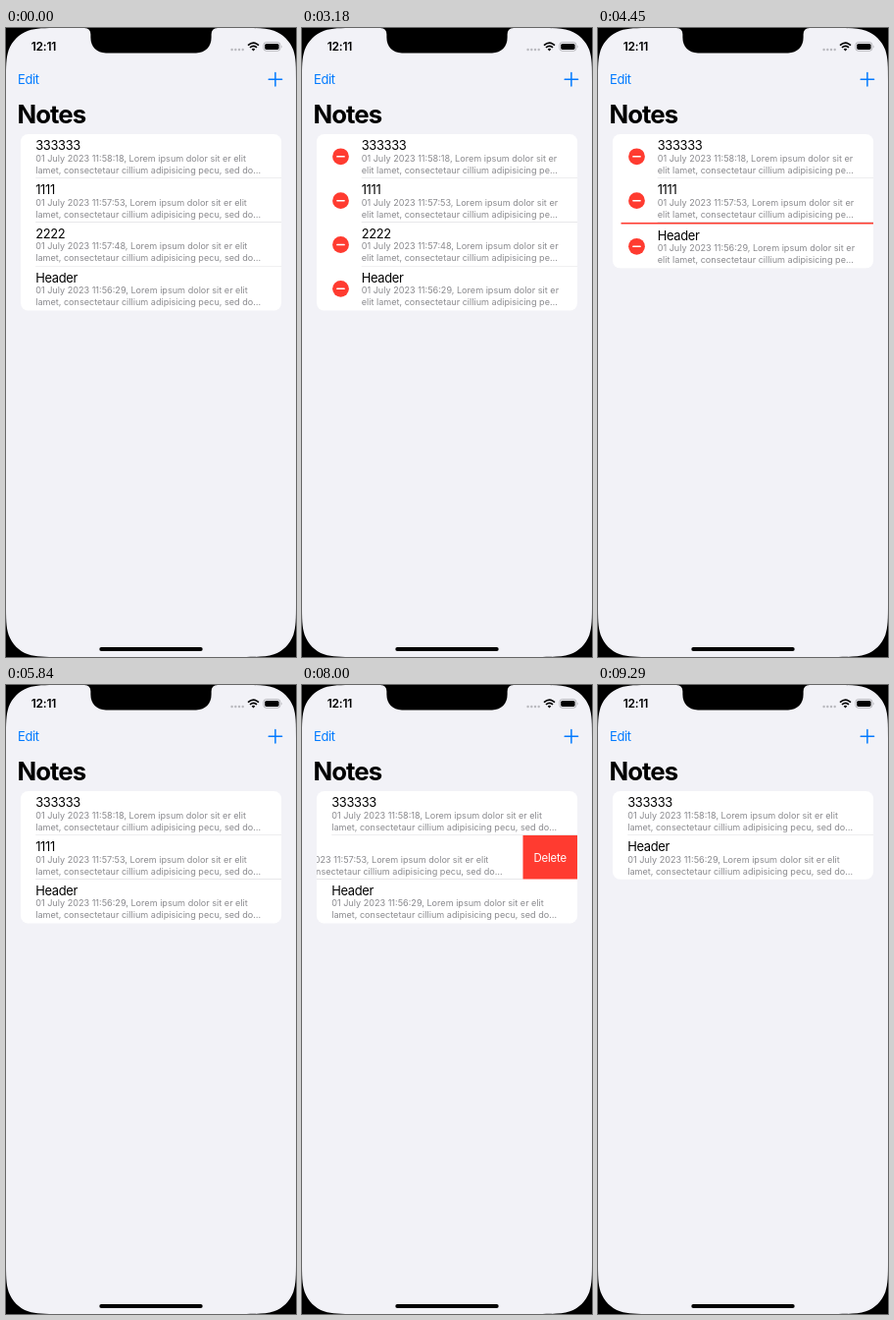
Write an HTML page that moves like this. It is 296 px wide and 640 px high and loops after 9580 ms.

```html
<!DOCTYPE html>
<html lang="en">
<head>
<meta charset="utf-8">
<title>Notes</title>
<style>
  html, body { margin: 0; width: 100%; height: 100%; overflow: hidden; background: #f2f2f7; }
  #stage { display: block; width: 296px; height: 640px; }
  text { font-family: Inter, "Liberation Sans", sans-serif; }
  .head { font-size: 12.9px; letter-spacing: -.33px; }
  .sub { font-size: 9.1px; fill: #8a8a8e; }
  .del { font-size: 11.4px; letter-spacing: -.2px; fill: #fff; text-anchor: middle; }
  .title { font-size: 25.8px; font-weight: 700; letter-spacing: -1px; }
  .time { font-size: 12px; font-weight: 600; letter-spacing: -.25px; }
</style>
</head>
<body>
<svg id="stage" viewBox="0 0 296 640">
  <rect width="296" height="640" fill="#f2f2f7"/>
  <text id="edit" class="head" x="12.1" y="56.8" fill="#007aff">Edit</text>
  <path d="M268.2 52.3h13.4M274.9 45.6v13.4" stroke="#007aff" stroke-width="1.5" stroke-linecap="round"/>
  <text class="title" x="11.6" y="96.7">Notes</text>
  <rect id="card" x="15" y="108" width="266" rx="7.6" fill="#fff"/>
  <g id="list"></g>

  <text class="time" x="25.8" y="23.2">12:11</text>
  <g fill="#b9b9be">
    <circle cx="230.6" cy="22" r="1.2"/><circle cx="234.3" cy="22" r="1.2"/>
    <circle cx="238" cy="22" r="1.2"/><circle cx="241.7" cy="22" r="1.2"/>
  </g>
  <g fill="none" stroke="#000" stroke-width="1.7">
    <path d="M247 17.6q5.5-4.9 11 0M249 19.8q3.5-3 7 0"/>
  </g>
  <path d="M250.7 21.5q1.8-1.4 3.6 0l-1.8 1.9z"/>
  <rect x="262.9" y="14.6" width="17" height="8.6" rx="2.7" fill="none" stroke="#a3a3a7" stroke-width=".8"/>
  <rect x="264.2" y="15.9" width="14.4" height="6" rx="1.6"/>
  <path d="M280.9 17.4q1.5 1.5 0 3z" fill="#a3a3a7"/>

  <path d="M80 0Q86.4 .4 86.4 6.5V9.5C86.4 19 92.5 25.4 102 25.4H194C203.5 25.4 209.6 19 209.6 9.5V6.5Q209.6 .4 216 0Z"/>
  <g id="corners"></g>
  <rect x="95.3" y="630.1" width="105.4" height="3.9" rx="1.95"/>
</svg>
<script>
const LOOP = 9580, STEP = 110;
const TOP = 108, ROW = 44.85, LEFT = 15, WIDTH = 266;
const INDENT = 30.5, BUTTON = 55.5, RED = '#ff3b30';

// Bursts of motion: start time and number of screen refreshes.
const BURSTS = [[1340, 1], [1550, 4], [3180, 6], [4230, 7], [5400, 5], [7230, 9], [8610, 7]];

const NOTES = [
  ['333333', '11:58:18'], ['1111', '11:57:53'], ['2222', '11:57:48'], ['Header', '11:56:29']
];

const $ = id => document.getElementById(id);

function add(parent, tag, attrs, text) {
  const el = document.createElementNS('http://www.w3.org/2000/svg', tag);
  set(el, attrs);
  if (text) el.textContent = text;
  return parent.appendChild(el);
}

function set(el, attrs) {
  for (const k in attrs) el.setAttribute(k, attrs[k]);
}

const shift = (el, x) => el.setAttribute('transform', `translate(${x.toFixed(3)} 0)`);

function spring(t, start, rate) {
  const x = Math.max(0, t - start) / 1000 * rate;
  return x > 7 ? 1 : 1 - (1 + x) * Math.exp(-x);
}

function ramp(t, a, b) {
  const x = Math.min(1, Math.max(0, (t - a) / (b - a)));
  return x * x * (3 - 2 * x);
}

function snap(t) {
  let out = 0;
  for (const [a, n] of BURSTS)
    if (t >= a) out = a + Math.min(n - 1, Math.floor((t - a) / STEP)) * STEP;
  return out;
}

function makeRow([name, clock]) {
  const box = add($('list'), 'svg', { x: LEFT, width: WIDTH, overflow: 'hidden' });
  const glow = add(box, 'rect', { width: WIDTH, height: ROW, fill: '#c9c9ca' });
  const cell = add(box, 'g', {});
  const minus = add(cell, 'g', {});
  add(minus, 'circle', { cx: 24.5, cy: 22.8, r: 8.4, fill: RED });
  add(minus, 'rect', { x: 20.2, y: 22.05, width: 8.6, height: 1.5, rx: .6, fill: '#fff' });

  const body = add(cell, 'g', {});
  add(body, 'text', { class: 'head', x: 15.2, y: 16.2 }, name);
  const copy = (first, second) => {
    const g = add(body, 'g', {});
    add(g, 'text', { class: 'sub', x: 15.2, y: 27.8 }, `01 July 2023 ${clock}, Lorem ipsum dolor sit er${first}`);
    add(g, 'text', { class: 'sub', x: 15.2, y: 39.8 }, second);
    return g;
  };
  const wide = copy(' elit', 'lamet, consectetaur cillium adipisicing pecu, sed do…');
  const narrow = copy('', 'elit lamet, consectetaur cillium adipisicing pe…');
  const line = add(body, 'rect', { x: 15.2, y: ROW - .4, width: WIDTH - 15.2, height: .7, fill: '#d3d3d7' });

  const button = add(box, 'g', {});
  add(button, 'rect', { width: WIDTH, height: ROW, fill: RED });
  add(button, 'text', { class: 'del', x: BUTTON / 2, y: 26.7 }, 'Delete');
  return { box, glow, cell, minus, body, wide, narrow, line, button };
}

const rows = NOTES.map(makeRow);

// Continuous screen corners, mirrored into place.
const R = 35.7;
const corner = 'M0 0H' + 1.5287 * R + 'C' + [
  1.0885, 0, .8684, 0, .6315, .0749,
  .3728, .1691, .1691, .3728, .0749, .6315,
  0, .8684, 0, 1.0885, 0, 1.5287
].map(v => (v * R).toFixed(2)).join(' ') + 'Z';
for (const sx of [1, -1])
  for (const sy of [1, -1])
    add($('corners'), 'path', {
      d: corner,
      transform: `translate(${sx < 0 ? 296 : 0} ${sy < 0 ? 640 : 0}) scale(${sx} ${sy})`
    });

function draw(time) {
  const t = snap(time);
  const leaving = t >= 5400;
  const editing = leaving ? 1 - spring(t, 5500, 22) : spring(t, 1540, 22);
  const slim = editing > (leaving ? .15 : 0);
  const dim = (t >= 1340 && t < 1550) || (t >= 5400 && t < 5510);
  $('edit').setAttribute('opacity', dim ? .3 : 1);

  const open = [0, ramp(t, 7310, 7960), spring(t, 3220, 16), 0];
  const gone = [0, spring(t, 8580, 20), spring(t, 4200, 20), 0];
  const glow = t < 7230 ? 0 : 1 - ramp(t, 7230, 7450);

  let y = TOP;
  rows.forEach((r, i) => {
    const height = ROW * (1 - gone[i]);
    const pulled = BUTTON * open[i] + (WIDTH - BUTTON) * gone[i];
    set(r.box, { y, height, visibility: height > .01 ? 'visible' : 'hidden' });
    r.glow.setAttribute('opacity', i === 1 ? glow : 0);
    shift(r.cell, -pulled);
    shift(r.minus, INDENT * (editing - 1));
    r.minus.setAttribute('opacity', editing);
    shift(r.body, INDENT * editing);
    r.wide.setAttribute('display', slim ? 'none' : 'inline');
    r.narrow.setAttribute('display', slim ? 'inline' : 'none');
    r.line.setAttribute('display', i < 3 ? 'inline' : 'none');
    shift(r.button, WIDTH - pulled);
    y += height;
  });
  $('card').setAttribute('height', y - TOP);
}

function tick() {
  draw(performance.now() % LOOP);
  requestAnimationFrame(tick);
}
tick();
</script>
</body>
</html>
```
